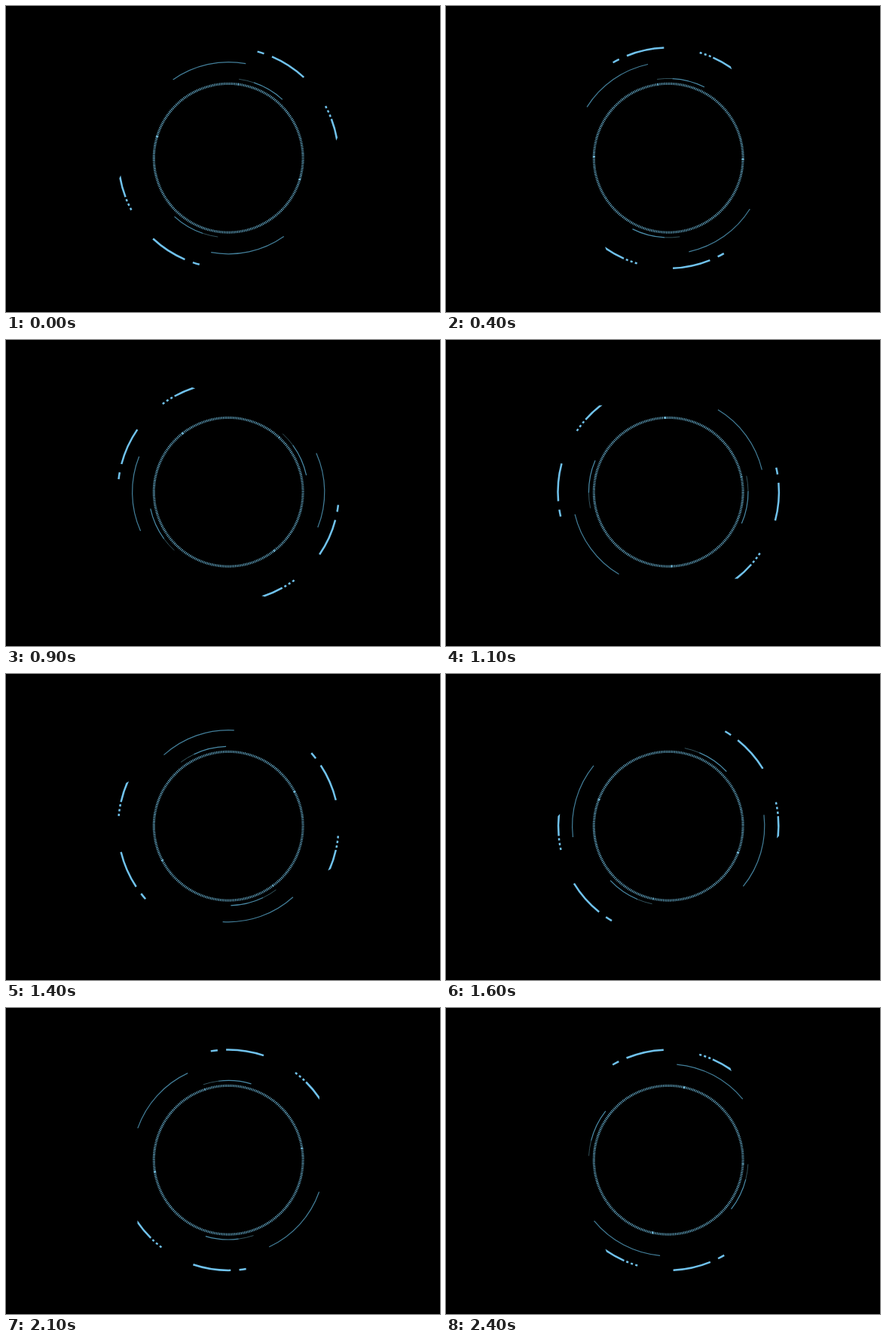
Recreate the animation shown at these times as an HTML page with a canvas. Size 576 px wide and 407 px high, loop 2500 ms.

```html
<!DOCTYPE html>
<html lang="en">
<head>
<meta charset="utf-8">
<title>Rotating dial</title>
<style>
  html, body { margin: 0; width: 100%; height: 100%; overflow: hidden; background: #000; }
  canvas { display: block; }
</style>
</head>
<body>
<canvas id="stage" width="576" height="407"></canvas>
<script>
const ctx = document.getElementById('stage').getContext('2d');
const LOOP = 2500, STEP = 100, DEG = Math.PI / 180;

// Angles in degrees, counterclockwise, at the given steps
const steps = [0, 4, 7, 11, 14, 18, 24];
const outerKeys = [66.8, 112.1, 145, 184.8, 213.4, 247.9, 292.3];
const middleKeys = [125.2, 147.9, 177.2, 239, 312.2, 425.3, 625];
const innerKeys = [82.4, 98.2, 74.7, 11.7, -53.3, -156.1, -363];

// Parabola through three neighbouring keys
function parabola(keys, first, n) {
  const i = Math.max(0, Math.min(steps.length - 3, first));
  const [a, b, c] = steps.slice(i, i + 3);
  return keys[i] * (n - b) * (n - c) / ((a - b) * (a - c)) +
    keys[i + 1] * (n - a) * (n - c) / ((b - a) * (b - c)) +
    keys[i + 2] * (n - a) * (n - b) / ((c - a) * (c - b));
}

// Smooth curve: blend the two parabolas that share the current span
function angleAt(keys, n) {
  let i = 0;
  while (i < steps.length - 2 && n >= steps[i + 1]) i++;
  const u = (n - steps[i]) / (steps[i + 1] - steps[i]);
  return parabola(keys, i - 1, n) * (1 - u) + parabola(keys, i, n) * u;
}

function arc(radius, from, to, width, color) {
  ctx.beginPath();
  ctx.arc(0, 0, radius, from * DEG, to * DEG);
  ctx.lineWidth = width;
  ctx.strokeStyle = color;
  ctx.stroke();
}

// Draws a part twice, half a turn apart
function pair(angle, draw) {
  for (const turn of [0, 180]) {
    ctx.save();
    ctx.rotate((angle + turn) * DEG);
    draw();
    ctx.restore();
  }
}

function outer() {
  const color = '#70c2ec';
  arc(146.7, -19.8, 0, 2.5, color);
  arc(146.7, 4.4, 8, 2.5, color);
  for (const a of [-39.8, -42.3, -44.8]) arc(146.2, a, a + 1.2, 2.5, color);
  // Band with a slanted tip
  ctx.beginPath();
  ctx.arc(0, 0, 147.4, -56.2 * DEG, -46 * DEG);
  ctx.arc(0, 0, 144.9, -46 * DEG, -57.6 * DEG, true);
  ctx.fillStyle = color;
  ctx.fill();
}

function middle() {
  arc(127.6, -45.6, 0, 1.2, '#437f9a');
}

function inner() {
  arc(105.8, -35, -11, 1.2, '#4a8ba8');
  arc(105.8, -11, 0, 0.9, '#34555f');
  arc(98.8, 80.1, 81.3, 3, '#6fb4d2');
}

function ticks(angle) {
  const radius = 98.9, pitch = 2 * Math.PI * radius / 280;
  ctx.save();
  ctx.rotate(angle * DEG);
  ctx.setLineDash([pitch / 2, pitch / 2]);
  arc(radius, 0, 360, 3.2, '#62a5c2');
  ctx.restore();
}

function frame(now) {
  const n = Math.floor(now % LOOP / STEP);
  const spin = angleAt(innerKeys, n);
  ctx.setTransform(1, 0, 0, 1, 0, 0);
  ctx.fillStyle = '#000';
  ctx.fillRect(0, 0, 576, 407);
  ctx.setTransform(1, 0, 0, -1, 295.2, 202.2);
  ticks(spin);
  pair(spin, inner);
  pair(angleAt(middleKeys, n), middle);
  pair(angleAt(outerKeys, n), outer);
}

const start = performance.now();
function loop() {
  frame(performance.now() - start);
  requestAnimationFrame(loop);
}
loop();
</script>
</body>
</html>
```
